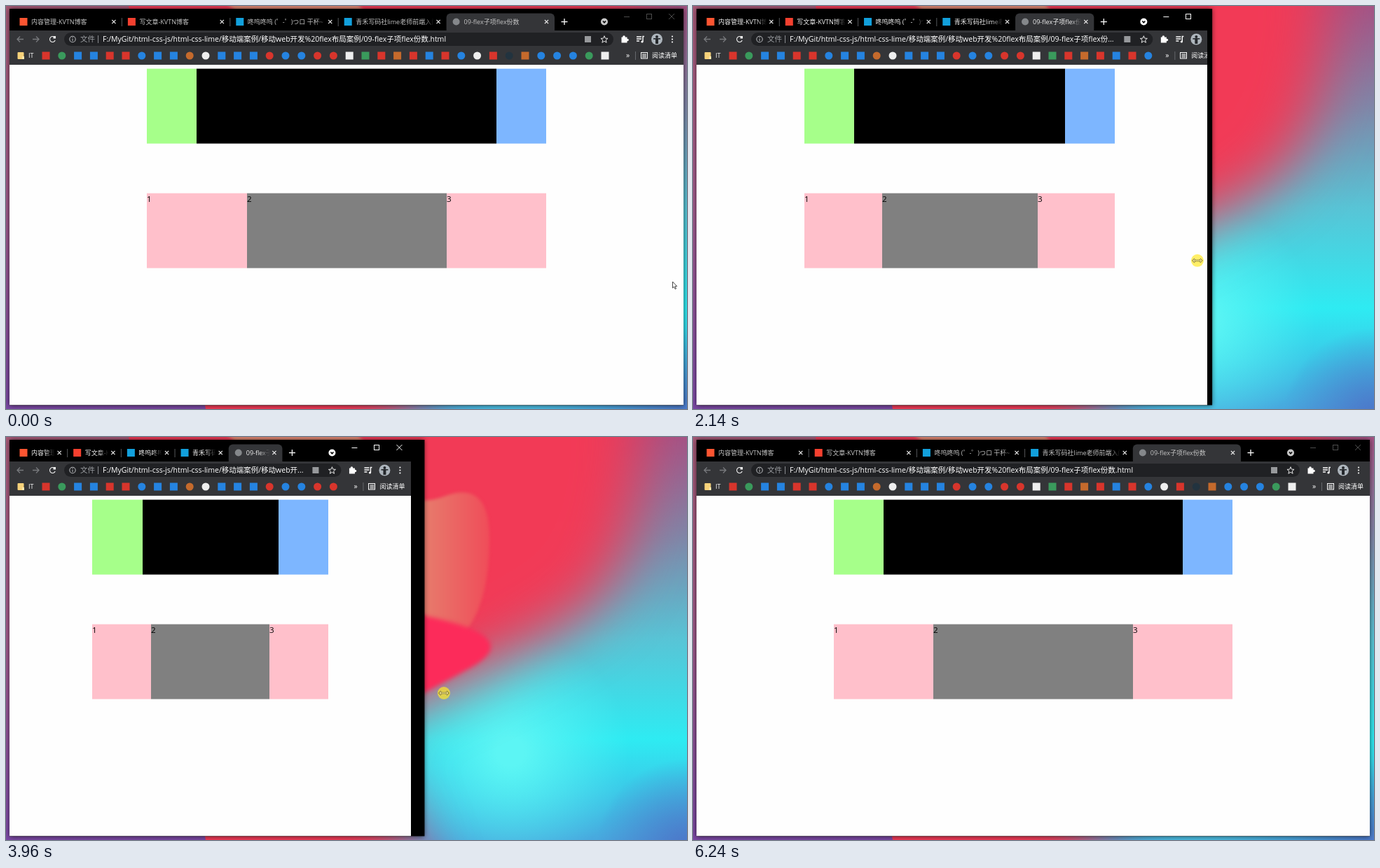
Recreate the animation shown at these times as an HTML page with a canvas. Size 972 px wide and 576 px high, loop 6.34 s.

```html
<!DOCTYPE html>
<html lang="zh-CN">
<head>
<meta charset="utf-8">
<title>flex</title>
<style>
  html, body { margin: 0; width: 100%; height: 100%; overflow: hidden; background: #000; }
  canvas { display: block; }
</style>
</head>
<body>
<canvas id="stage" width="972" height="576"></canvas>
<script>
const WIDTH = 972, HEIGHT = 576, LOOP = 6340;
const LEFT = 5, TOP = 4, BOTTOM = 570.5;
const WIDE = 967, NARROW = 460;
const SHRINK = 1217, EXPAND = 3553;
const FONT = '"Open Sans", "Noto Sans CJK SC", "Noto Sans CJK", sans-serif';
const BAR = '#343538', ICON = '#e6e6e6';
const ctx = document.getElementById('stage').getContext('2d');

const URL_TEXT = 'F:/MyGit/html-css-js/html-css-lime/移动端案例/移动web开发%20flex布局案例/09-flex子项flex份数.html';
const TABS = [
  ['内容管理-KVTN博客', '#fc5531'],
  ['写文章-KVTN博客', '#f5402f'],
  ['咚呜咚呜 (゜-゜)つロ 干杯~', '#12a0dc'],
  ['青禾写码社lime老师前端入门', '#12a0dc'],
  ['09-flex子项flex份数', '#85888b']
];
// One letter per bookmark: its colour, upper case for a round mark.
const MARKS = 'rGbbrrBbbOWbbbRBBRRwgrorbrBWrKoBBBGw';
const MARK_COLORS = { r: '#d8352c', g: '#3a9a5c', b: '#2583e0', o: '#c56a2c', w: '#eeeeee', k: '#22333f' };

/* ---------- motion ---------- */
const mix = (a, b, k) => a + (b - a) * k;
const clamp01 = v => Math.max(0, Math.min(1, v));
const smooth = v => { const k = clamp01(v); return k * k * (3 - 2 * k); };
const hold = (t, start, step) => start + step * Math.floor((t - start) / step);

function pointerX(t) {
  if (t < SHRINK) return WIDE;
  return t < EXPAND
    ? mix(WIDE, NARROW, smooth((t - 1000) / 2325))
    : mix(NARROW, WIDE - 1, smooth((t - 3328) / 1656));
}

// The frame, the page and its layout follow the pointer with growing delay.
function dragState(t) {
  const time = t < EXPAND ? hold(t, SHRINK, 51) + 8 : hold(t, EXPAND, 50.4) + 4;
  const x = pointerX(time), layout = pointerX(time - 112);
  return {
    x,
    y: time < EXPAND ? mix(370, 358, (x - NARROW) / (WIDE - NARROW)) : 366,
    layout,
    outer: pointerX(time - 65),
    visible: Math.round(Math.min(pointerX(time - 42), layout))
  };
}

/* ---------- wallpaper ---------- */
function gradient(g, area, colors) {
  const paint = area.length === 4 ? g.createLinearGradient(...area) : g.createRadialGradient(...area);
  colors.forEach((color, i) => paint.addColorStop(i / (colors.length - 1), color));
  return paint;
}

function blob(g, points, fill, blur) {
  const mid = (a, b) => [(a[0] + b[0]) / 2, (a[1] + b[1]) / 2];
  g.filter = `blur(${blur}px)`;
  g.beginPath();
  g.moveTo(...mid(points[points.length - 1], points[0]));
  points.forEach((p, i) => g.quadraticCurveTo(...p, ...mid(p, points[(i + 1) % points.length])));
  g.fillStyle = fill;
  g.fill();
  g.filter = 'none';
}

function makeWallpaper() {
  const canvas = document.createElement('canvas');
  canvas.width = WIDTH;
  canvas.height = HEIGHT;
  const g = canvas.getContext('2d');
  const wash = (area, ...colors) => {
    g.fillStyle = gradient(g, area, colors);
    g.fillRect(0, 0, WIDTH, HEIGHT);
  };
  wash([0, 0, 0, HEIGHT], '#a05588', '#7d88aa', '#58c4d6', '#2eebf2', '#48a8de');
  wash([720, 450, 20, 720, 450, 170], '#5cf5f4', 'rgba(80,240,243,0)');
  wash([972, 590, 0, 972, 590, 130], '#4c74c8', 'rgba(76,116,200,0)');
  blob(g, [[-200, -300], [900, -300], [915, 200], [700, 330], [490, 420], [560, 520], [640, 800], [-200, 800]],
    '#f23a56', 42);
  blob(g, [[200, -90], [480, -60], [560, 110], [690, 60], [690, 230], [630, 315], [570, 205], [440, 190], [400, 60]],
    gradient(g, [500, 0, 695, 0], ['#e38872', '#e77b6c', '#f04a58']), 2);
  blob(g, [[380, 285], [520, 235], [735, 290], [590, 370], [380, 480]], '#fc2b5a', 3);
  g.fillStyle = gradient(g, [0, 0, 0, HEIGHT], ['#a85a78', '#a05a8a', '#7a48a4']);
  g.beginPath();
  [[0, 0], [175, 0], [285, HEIGHT], [0, HEIGHT]].forEach(p => g.lineTo(...p));
  g.fill();
  return canvas;
}
const wallpaper = makeWallpaper();

/* ---------- drawing helpers ---------- */
function rect(x, y, w, h, color) {
  ctx.fillStyle = color;
  ctx.fillRect(x, y, w, h);
}

function disc(x, y, r, color) {
  ctx.fillStyle = color;
  ctx.beginPath();
  ctx.arc(x, y, r, 0, 7);
  ctx.fill();
}

function ring(x, y, r, color, from = 0, to = 7) {
  ctx.strokeStyle = color;
  ctx.lineWidth = 1.1;
  ctx.beginPath();
  ctx.arc(x, y, r, from, to);
  ctx.stroke();
}

function pill(x, y, w, h, radii, color) {
  ctx.fillStyle = color;
  ctx.beginPath();
  ctx.roundRect(x, y, w, h, radii);
  ctx.fill();
}

function lines(color, width, ...paths) {
  ctx.strokeStyle = color;
  ctx.lineWidth = width;
  ctx.beginPath();
  paths.forEach(p => {
    ctx.moveTo(p[0], p[1]);
    for (let i = 2; i < p.length; i += 2) ctx.lineTo(p[i], p[i + 1]);
  });
  ctx.stroke();
}

function text(value, x, y, size, color) {
  ctx.font = `${size}px ${FONT}`;
  ctx.fillStyle = color;
  ctx.fillText(value, x, y);
}

const cross = (x, y, r, color, width = 1.2) =>
  lines(color, width, [x - r, y - r, x + r, y + r], [x + r, y - r, x - r, y + r]);

// Horizontal arrow; dir is -1 for left, 1 for right.
const arrow = (tip, y, dir, length, head, color, width) =>
  lines(color, width, [tip - dir * length, y, tip, y],
    [tip - dir * head, y - head, tip, y, tip - dir * head, y + head]);

function ellipsize(value, room) {
  if (ctx.measureText(value).width <= room) return value;
  while (value && ctx.measureText(value + '...').width > room) value = value.slice(0, -1);
  return value + '...';
}

/* ---------- browser ---------- */
function drawTab(x, pitch, [title, color], active, focused) {
  const narrow = pitch < 70, iconX = x + (narrow ? 11 : 14);
  if (active) {
    pill(x, 10.5, pitch, 25, [6, 6, 0, 0], BAR);
    disc(iconX, 22.5, 5, color);
  } else {
    rect(iconX - 5.5, 17, 11, 11, color);
  }
  const closeX = x + pitch - 11.5, hasClose = active || !narrow;
  const start = iconX + 11, end = hasClose ? closeX - 7 : x + pitch - 5;
  if (hasClose) cross(closeX, 22.5, 2.6, '#eee');
  if (end <= start) return;
  const bright = focused ? '#f2f2f2' : '#c4c4c4';
  ctx.save();
  ctx.beginPath();
  ctx.rect(start, 10, end - start, 24);
  ctx.clip();
  text(title, start, 26, 9, gradient(ctx, [Math.max(start, end - 14), 0, end, 0], [bright, 'rgba(200,200,200,.05)']));
  ctx.restore();
}

function drawTitleBar(edge, focused) {
  const pitch = (edge - 195) / TABS.length;
  TABS.forEach((tab, i) => {
    const x = 11 + pitch * i, active = i === TABS.length - 1;
    if (i && !active) lines('#55575a', 1, [x, 17, x, 29]);
    drawTab(x, pitch, tab, active, focused);
  });

  const plusX = edge - 170;
  lines('#eee', 1.4, [plusX - 4.5, 22.5, plusX + 4.5, 22.5], [plusX, 18, plusX, 27]);
  disc(edge - 113, 22.5, 5, focused ? '#fff' : '#c8c8c8');
  lines('#000', 1.6, [edge - 115, 21.5, edge - 113, 23.8, edge - 111, 21.5]);

  const control = focused ? '#fff' : '#4c4c4c';
  lines(control, 1, [edge - 85, 15.5, edge - 77, 15.5]);
  ctx.strokeRect(Math.round(edge - 53) + .5, 11.5, 7, 7);
  cross(edge - 17, 15, 4, control, 1);
}

function drawStar(x, y) {
  ctx.strokeStyle = ICON;
  ctx.lineWidth = 1;
  ctx.beginPath();
  for (let i = 0; i < 10; i++) {
    const r = i % 2 ? 2.3 : 5.3, a = i * Math.PI / 5 - Math.PI / 2;
    ctx.lineTo(x + r * Math.cos(a), y + r * Math.sin(a));
  }
  ctx.closePath();
  ctx.stroke();
}

function drawAddressBar(edge) {
  arrow(16, 47.5, -1, 9, 4, '#77797c', 1.3);
  arrow(47, 47.5, 1, 9, 4, '#77797c', 1.3);
  ring(66.5, 47.5, 4, '#f0f0f0', .4, 5.6);
  rect(67.5, 43, 3.5, 3.5, '#f0f0f0');

  pill(83, 38, edge - 183, 19, 9.5, '#202124');
  ring(95, 47.5, 4.2, '#b5b7ba');
  lines('#b5b7ba', 1.1, [95, 47, 95, 50], [95, 44.8, 95, 46]);
  text('文件', 106, 51, 10.5, '#9a9da1');
  lines('#8a8c90', 1, [131.5, 42, 131.5, 53]);
  text(ellipsize(URL_TEXT, edge - 291), 138, 51, 10.5, '#fff');

  rect(edge - 141, 43, 9, 9, '#97999c');
  drawStar(edge - 113, 48);

  rect(edge - 88.5, 44.5, 8, 8, '#fff');
  disc(edge - 85, 44, 1.8, '#fff');
  disc(edge - 80, 48.5, 1.8, '#fff');
  [44, 47, 50].forEach(y => lines('#fff', 1.4, [edge - 67, y, edge - (y < 50 ? 60 : 63), y]));
  lines('#fff', 1.4, [edge - 58, 51, edge - 58, 43.5, edge - 56, 43.5]);
  disc(edge - 59, 51, 1.6, '#fff');

  disc(edge - 38, 47.5, 8, '#aeb6bd');
  disc(edge - 38, 44, 2, '#25282c');
  rect(edge - 43, 46, 10, 1.6, '#25282c');
  rect(edge - 40, 46, 4, 8, '#25282c');
  [43.5, 47.5, 51.5].forEach(y => disc(edge - 16, y, 1.1, '#fff'));
}

function drawBookmarks(edge) {
  pill(16.5, 66, 9, 10, 1, '#f6d27a');
  rect(23, 72, 3, 4, '#fbe7ae');
  text('IT', 32, 74, 9, '#fff');
  [...MARKS].forEach((mark, i) => {
    const x = 57 + 22.8 * i, key = mark.toLowerCase();
    if (x > edge - 95) return;
    if (mark === key) rect(x - 5.5, 65.5, 11, 11, MARK_COLORS[key]);
    else disc(x, 71, 5.5, MARK_COLORS[key]);
  });
  text('»', edge - 82, 74, 10.5, '#fff');
  lines('#66686c', 1, [edge - 68.5, 65, edge - 68.5, 77]);
  ctx.strokeStyle = '#fff';
  ctx.strokeRect(Math.round(edge - 61) + .5, 66.5, 9, 8.5);
  [69, 71, 73].forEach(y => lines('#fff', 1, [edge - 59, y, edge - 53, y]));
  text('阅读清单', edge - 45, 74, 9, '#fff');
}

function drawRow(x, y, cells) {
  return cells.map(([width, color]) => {
    const left = Math.round(x);
    x += width;
    rect(left, y, Math.round(x) - left, 107, color);
    return left;
  });
}

function drawPage(edge) {
  const client = edge - LEFT, width = .6 * (client - 12);
  const x = LEFT + (client - width) / 2, side = 71.25, part = width / 4;
  drawRow(x, 89.6, [[side, '#a6ff8a'], [width - 2 * side, '#000'], [side, '#7db6ff']]);
  drawRow(x, 267.6, [[part, '#ffc0cb'], [2 * part, '#808080'], [part, '#ffc0cb']])
    .forEach((left, i) => text(i + 1, left, 279.5, 11.6, '#000'));
}

function drawWindow({ outer, visible, layout }, focused) {
  ctx.save();
  ctx.shadowColor = 'rgba(0,0,0,.65)';
  ctx.shadowBlur = 7;
  rect(LEFT, TOP, outer - LEFT, BOTTOM - TOP, '#000');
  ctx.restore();

  ctx.save();
  ctx.beginPath();
  ctx.rect(LEFT, TOP, visible - LEFT, BOTTOM - TOP);
  ctx.clip();
  rect(LEFT, 35, WIDTH, 49, BAR);
  rect(LEFT, 84, WIDTH, BOTTOM - 84, '#fefefe');
  drawTitleBar(layout, focused);
  drawAddressBar(layout);
  drawBookmarks(layout);
  drawPage(layout);
  ctx.restore();
}

/* ---------- pointer ---------- */
function drawArrowPointer(x, y) {
  ctx.beginPath();
  [[0, 0], [0, 9], [2.1, 7.2], [3.6, 10.6], [5, 10], [3.5, 6.7], [6.2, 6.6]]
    .forEach(([dx, dy]) => ctx.lineTo(x + dx, y + dy));
  ctx.closePath();
  ctx.fillStyle = '#fff';
  ctx.fill();
  ctx.strokeStyle = '#333';
  ctx.lineWidth = .9;
  ctx.stroke();
}

function drawResizePointer(x, y) {
  disc(x, y, 9, 'rgba(255,232,40,.7)');
  [['rgba(70,60,20,.6)', 2.6], ['#fff3a0', 1]].forEach(([color, width]) =>
    [-1, 1].forEach(dir => arrow(x + 6 * dir, y, dir, 6, 2.5, color, width)));
}

function drawPointer(t, drag) {
  if (t < 670) {
    const k = hold(t, 0, 51) / 620;
    drawArrowPointer(mix(951.5, 965, k), mix(394, 357, k));
  } else if (t < 5480) {
    drawResizePointer(drag.x, drag.y);
  } else if (t < 5930) {
    const k = (hold(t, 5480, 50) - 5430) / 500;
    drawArrowPointer(mix(966, 676, k), mix(367, 580, k));
  }
}

function frame() {
  const t = performance.now() % LOOP;
  const drag = dragState(t);
  ctx.drawImage(wallpaper, 0, 0);
  drawWindow(drag, t >= 1070 && t < 6240);
  drawPointer(t, drag);
  requestAnimationFrame(frame);
}
frame();
</script>
</body>
</html>
```
